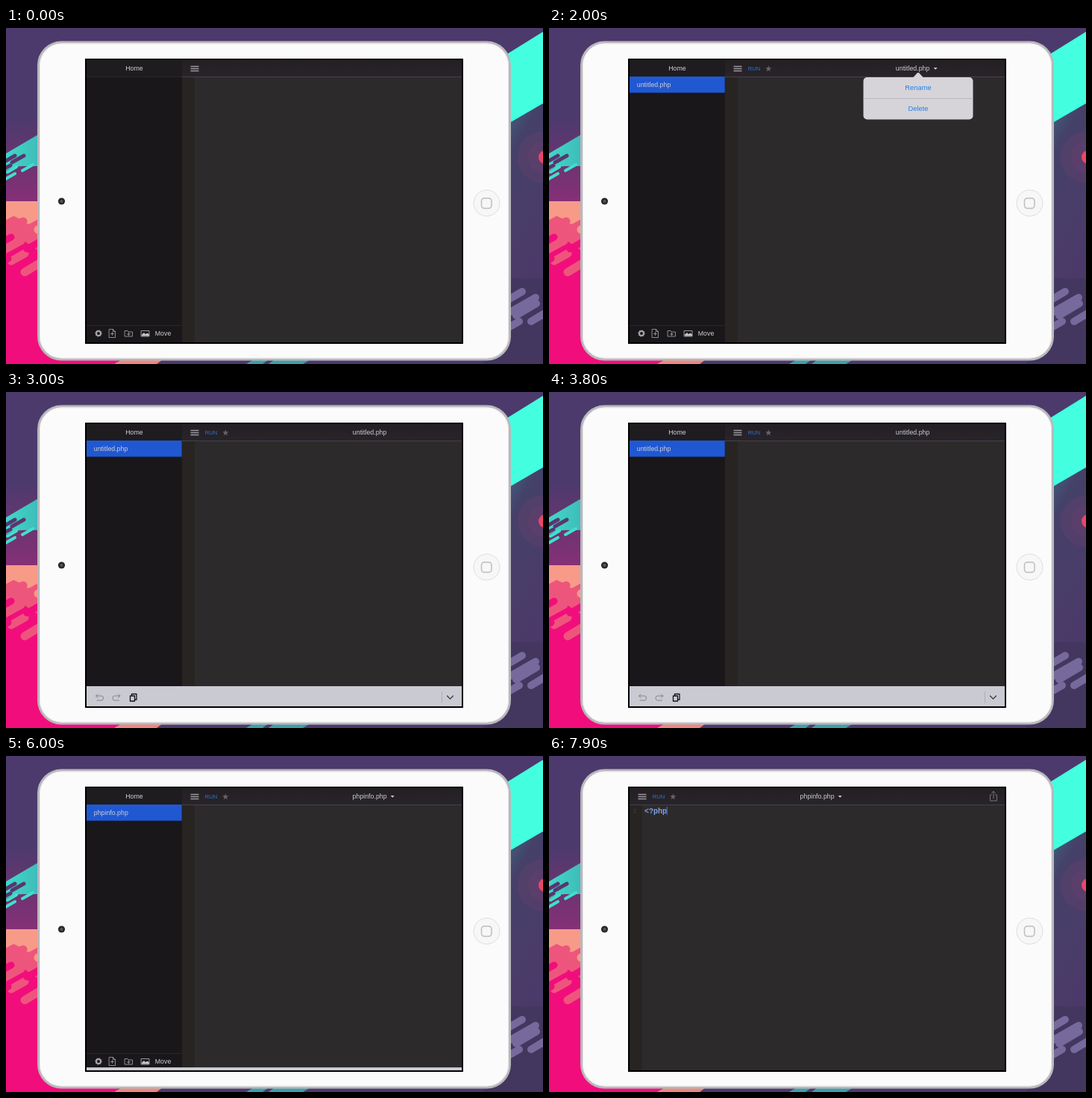
Write an HTML page that moves like this. It is 720 by 450 pixels and loops after 8000 ms.

```html
<!DOCTYPE html>
<html lang="en">
<head>
<meta charset="utf-8">
<title>Code editor on a tablet</title>
<style>
  html, body { margin: 0; width: 100%; height: 100%; overflow: hidden; background: #4c3a6c; }
  svg { display: block; }
  text { font: 8.8px "Liberation Sans", Arial, sans-serif; fill: #cfced3; white-space: pre; }
  .mid { text-anchor: middle; }
  .line { fill: none; stroke-linecap: round; stroke-linejoin: round; }
  .loop { animation: 8s linear infinite both; }

  #pane { animation-name: pane; }
  #popover { animation-name: popover; }
  #bar { animation-name: bar; }
  #keys { animation-name: keys; }

  @keyframes pane {
    0%, 79.4% { transform: translateX(0); animation-timing-function: ease-in-out; }
    83%, 100% { transform: translateX(-128px); }
  }
  @keyframes popover {
    0%, 23.1% { opacity: 0; }
    25%, 30% { opacity: 1; }
    33%, 100% { opacity: 0; }
  }
  @keyframes bar {
    0%, 34.5% { transform: translateY(28px); animation-timing-function: ease-out; }
    37.5%, 72.75% { transform: translateY(0); animation-timing-function: ease-in-out; }
    75.9%, 100% { transform: translateY(28px); }
  }
  @keyframes keys {
    0%, 85.5% { transform: translateY(22px); animation-timing-function: ease-out; }
    88%, 93.5% { transform: translateY(0); animation-timing-function: ease-in; }
    96%, 100% { transform: translateY(22px); }
  }
</style>
</head>
<body>
<svg width="720" height="450" viewBox="0 0 720 450">
  <defs>
    <linearGradient id="dusk" x1="0" y1="0" x2="0" y2="1">
      <stop offset="0" stop-color="#4c3a6c"/><stop offset="1" stop-color="#8a2f78"/>
    </linearGradient>
    <linearGradient id="teal" x1="0" y1="0" x2="1" y2="0">
      <stop offset="0" stop-color="#3fd9c8"/><stop offset="1" stop-color="#3fb9b8"/>
    </linearGradient>
    <linearGradient id="shade" x1="0" y1="0" x2=".35" y2="1">
      <stop offset="0" stop-color="#3f6a86"/><stop offset=".3" stop-color="#454169"/><stop offset="1" stop-color="#4b3a69"/>
    </linearGradient>
    <linearGradient id="head" x1="0" y1="0" x2="0" y2="1">
      <stop offset="0" stop-color="#231f22"/><stop offset="1" stop-color="#28242a"/>
    </linearGradient>
  </defs>

  <!-- wallpaper -->
  <rect width="720" height="450" fill="#4c3a6c"/>
  <rect y="120" width="50" height="120" fill="url(#dusk)"/>
  <path d="M0 168L46 141V185H22Q10 185 0 191Z" fill="url(#teal)"/>
  <g class="line" stroke-width="5">
    <path d="M-2 179l14-8M8 180l16-9M-2 188l8-4" stroke="#583770"/>
    <path d="M2 193l12-7M-2 203l14-8M22 191l14-8" stroke="#40e0cc" stroke-width="4"/>
  </g>
  <path d="M0 232H46V415L150 440V450H0Z" fill="#f20d7c"/>
  <path d="M0 232H46V300L24 285L0 296Z" fill="#ee557c"/>
  <path d="M0 232H46V250L28 260L0 247Z" fill="#f79a88"/>
  <g class="line" stroke-width="11">
    <path d="M-2 252l13-7M30 257l16-9M43 270l8-4" stroke="#f79a88"/>
    <path d="M9 267l14-8M-2 297l22-12M7 312l18-10M25 327l20-12" stroke="#ee557c"/>
    <path d="M-2 285l9-5M28 296l16-9M-2 312l5-3" stroke="#f20d7c" stroke-width="9"/>
  </g>
  <path d="M145 450l10-6h55l-8 6Z" fill="#f1857f"/>
  <path d="M322 450l10-6h20l-8 6ZM352 450l8-6h48l-10 6Z" fill="#3f9fa8"/>
  <path d="M670 124L720 96V345H670Z" fill="url(#shade)"/>
  <path d="M670 36L720 5V101L670 130Z" fill="#43ffdf"/>
  <g fill="#7a406c" fill-opacity=".22">
    <circle cx="721" cy="173" r="35"/><circle cx="721" cy="173" r="21"/>
  </g>
  <circle cx="723" cy="173" r="9" fill="#ee4568"/>
  <path d="M670 335H720V450H640Z" fill="#43365f"/>
  <path class="line" d="M670 366l22-13M675 381l35-20M684 385l27-16M674 401l14-8M704 393l20-12" stroke="#756a9b" stroke-width="10"/>

  <!-- tablet -->
  <rect x="43.5" y="19" width="632" height="425" rx="31" fill="#fbfbfc" stroke="#b9b8bb" stroke-width="3"/>
  <rect x="45.5" y="21" width="628" height="421" rx="29" fill="none" stroke="#e8e8ea"/>
  <circle cx="74.500" cy="232" r="4.600" fill="#29292c"/>
  <circle cx="74.500" cy="232" r="2" fill="#57575d"/>
  <circle cx="644.500" cy="234.500" r="17.500" fill="#f7f7f7" stroke="#dedee0"/>
  <rect x="637.500" y="228" width="13.500" height="13.500" rx="3.800" fill="none" stroke="#bdbdbf" stroke-width="1.500"/>
  <rect x="106" y="41" width="507" height="382" fill="#000"/>

  <!-- screen -->
  <svg x="108" y="43" width="503" height="378" viewBox="108 43 503 378">
    <rect x="108" y="43" width="503" height="378" fill="#2d2a2c"/>
    <g id="pane" class="loop">
      <rect x="108" y="43" width="128" height="378" fill="#1a171b"/>
      <rect x="108" y="43" width="128" height="22" fill="#1f1c20"/>
      <path d="M108 65.500H236M108 398.500H236" stroke="#29262b"/>
      <text class="mid" x="172" y="57">Home</text>
      <g class="file">
        <rect x="108" y="65" width="127.700" height="21.700" fill="#2058d2"/>
        <text id="row" x="117.800" y="79" fill="#fff"></text>
      </g>
      <g class="line" stroke="#a9a7ae">
        <circle cx="124" cy="409" r="3" stroke-width="2"/>
        <circle cx="124" cy="409" r="4.300" stroke-dasharray="1.200 2.180" stroke-linecap="butt"/>
        <path d="M138.500 403.500h5l3 3v8h-8ZM143.500 403.500v3h3M140.500 409.500h4M142.500 407.500v4" stroke-width=".8"/>
        <path d="M159.500 405.500h3.500l1 1.500h5.500v6h-10ZM162.500 410h4M164.500 408v4" stroke-width=".8"/>
        <rect x="181.500" y="405.500" width="10.500" height="7.500" stroke-width=".9"/>
      </g>
      <path d="M182 412.500v-2l3-2.500 2 2 2.500-1.500 2.500 2v2Z" fill="#c5c3ca"/>
      <text x="199.800" y="412" font-size="8.500">Move</text>

      <rect x="236" y="43" width="503" height="22" fill="url(#head)"/>
      <rect x="236" y="65" width="503" height="356" fill="#2d2a2c"/>
      <rect x="236" y="66" width="17" height="355" fill="#272422"/>
      <path d="M236 65.500H739" stroke="#454147"/>
      <path d="M247.500 51.500h11M247.500 54.500h11M247.500 57.500h11" stroke="#9a979e" stroke-width="1.300"/>
      <g class="file">
        <text x="266.800" y="57.200" style="font-size:7.600px;fill:#2f74d6">RUN</text>
        <path d="M294.300 50.200l1.050 3 3.150.05-2.500 1.950.9 3.050-2.600-1.800-2.600 1.800.9-3.050-2.500-1.950 3.150-.05Z" fill="#66636a"/>
        <text id="title" class="mid" x="487.600" y="57.400"></text>
        <path id="arrow" d="M515.700 53h5l-2.500 2.700Z" fill="#cfced3"/>
        <path class="line" d="M721.500 52h-2v8h9v-8h-2M724 56.500v-9M721.700 49.500l2.300-2.300 2.300 2.300" stroke="#77747b"/>
      </g>
      <text id="num" x="241" y="76" style="font-size:7px;fill:#4d494d">1</text>
      <text id="code" x="256" y="77" style="font:bold 10px 'Liberation Mono',monospace;fill:#7ea2e2"></text>
      <rect id="caret" y="68" width="1.200" height="11" fill="#3d6de0"/>
    </g>

    <g id="popover" class="loop">
      <path d="M488 66.500l5.500-6q1.500-1.500 3 0l5.500 6Z" fill="#d6d4d8"/>
      <rect x="421.500" y="66" width="147" height="56.500" rx="5" fill="#d6d4d8"/>
      <path d="M421.500 94.500h147" stroke="#b4b1b8" stroke-width=".8"/>
      <g class="mid">
        <text x="495" y="83" style="font-size:9.400px;fill:#2380ee">Rename</text>
        <text x="495" y="111" style="font-size:9.400px;fill:#2380ee">Delete</text>
      </g>
    </g>

    <g id="bar" class="loop">
      <rect x="108" y="394" width="503" height="28" fill="#cacad2"/>
      <g class="line" stroke="#85858d">
        <path d="M123 405l-2.500 2 2.500 2.500M120.500 407h7.500q2.500 0 2.500 3t-2.500 3h-6"/>
        <path d="M150.500 405l2.500 2-2.500 2.500M153 407h-7.500q-2.500 0-2.500 3t2.500 3h6"/>
        <path d="M584.500 402v14" stroke="#adadb5"/>
        <path d="M591.500 407l4 4 4-4" stroke="#3a3a40" stroke-width="1.200"/>
        <path d="M166.500 407h6v7h-6ZM168.500 406.500v-2h6.500v7.500h-2" stroke="#111" stroke-width="1.300"/>
      </g>
    </g>

    <g id="keys" class="loop">
      <rect x="108" y="400.500" width="503" height="21" fill="#211e22"/>
    </g>
  </svg>
</svg>

<script>
  const $ = id => document.getElementById(id);
  const SVG = "http://www.w3.org/2000/svg";
  const OLD = "untitled.php", NEW = "phpinfo.php", CODE = "<?php";

  function add(parent, tag, attrs, label = "") {
    const el = document.createElementNS(SVG, tag);
    for (const k in attrs) el.setAttribute(k, attrs[k]);
    el.textContent = label;
    parent.append(el);
  }

  // slots 8 is left empty, before the two cursor keys
  ["tab", "({[", "\"'<>", "<html>", "<?php>", "$", ";", "=", "", "<", ">"].forEach((label, i) => {
    if (!label) return;
    const x = 111.3 + i * 45.65, arrow = i > 8;
    add($("keys"), "rect", { x, y: 403, width: 39.4, height: 15.5, rx: 3, fill: "#49464b" });
    add($("keys"), "text", {
      class: "mid", x: x + 19.7, y: arrow ? 415 : 413.6,
      style: `font-size:${arrow ? 13 : 8.2}px`
    }, label);
  });

  // number of keystrokes made at time t, one every 100 ms
  const strokes = (t, from, count) =>
    Math.max(0, Math.min(count, Math.floor((t - from) / 100) + 1));

  function titleAt(t) {
    if (t < 4350) return OLD.slice(0, OLD.length - 3 * strokes(t, 3850, 4));
    const n = strokes(t, 4350, 4) + strokes(t, 4950, 4) + strokes(t, 5450, 3);
    return NEW.slice(0, n);
  }

  function setText(el, value) {
    if (el.textContent !== value) el.textContent = value;
  }
  const show = (el, on) => { el.style.visibility = on ? "visible" : "hidden"; };

  const fileParts = document.querySelectorAll(".file");
  let start;

  function draw(now) {
    start ??= now;
    const t = (now - start) % 8000;
    const typed = strokes(t, 7450, 5);
    const hasFile = t >= 700;
    fileParts.forEach(el => show(el, hasFile));
    show($("arrow"), hasFile && (t < 2350 || t >= 5850));
    setText($("title"), titleAt(t));
    setText($("row"), t < 5850 ? OLD : NEW);
    setText($("code"), CODE.slice(0, typed));
    $("caret").setAttribute("x", 255.6 + 6 * typed);
    show($("caret"), t >= 6850);
    show($("num"), typed > 0);
    requestAnimationFrame(draw);
  }
  requestAnimationFrame(draw);
</script>
</body>
</html>
```
